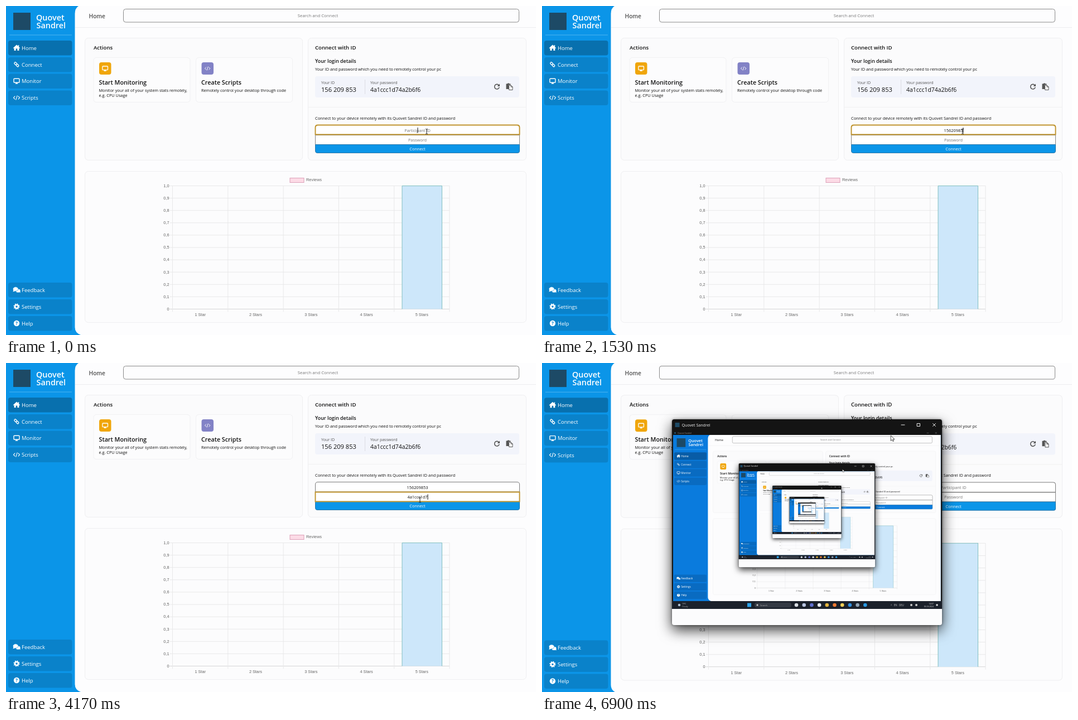
An HTML page that plays this animation: 950 by 590 pixels, repeating every 6.93 s.

```html
<!DOCTYPE html>
<html lang="en">
<head>
<meta charset="utf-8">
<style>
html, body { margin: 0; width: 100%; height: 100%; overflow: hidden; background: #0b95e8; }
svg { display: block; width: 950px; height: 590px; font-family: "Open Sans", "Noto Sans", sans-serif; --blue: #0b95e8; }
text { white-space: pre; }
.chart { font-family: "Liberation Sans", Arial, sans-serif; }
.remote { --blue: #0a7bdd; }
.shadow { filter: drop-shadow(0 0 2px rgba(0,0,0,.5)) drop-shadow(0 9px 12px rgba(0,0,0,.75)); }
</style>
</head>
<body>
<svg id="stage" viewBox="0 0 950 590"></svg>
<script>
const LOOP = 6930;
const ID = "156209853", PASSWORD = "4a1ccc1d74a2b6f6";
const BRAND = ["Quovet", "Sandrel"];
const OPEN = 6200, LAG = 120, LEVELS = 6, FOCUS_SWITCH = 1930;
const BLUE = "var(--blue)";

const rect = (x, y, w, h, fill, r = 0, stroke = "none", width = 1) =>
  `<rect x="${x}" y="${y}" width="${w}" height="${h}" rx="${r}" fill="${fill}" stroke="${stroke}" stroke-width="${width}"/>`;
const line = (x1, y1, x2, y2, color) =>
  `<path d="M${x1} ${y1}L${x2} ${y2}" stroke="${color}"/>`;
const stroke = (d, color, width = 1.2) =>
  `<path d="${d}" fill="none" stroke="${color}" stroke-width="${width}" stroke-linecap="round" stroke-linejoin="round"/>`;
const shape = (d, fill, border = "none") => `<path d="${d}" fill="${fill}" stroke="${border}"/>`;
const circle = (x, y, r, fill) => `<circle cx="${x}" cy="${y}" r="${r}" fill="${fill}"/>`;
const text = (x, y, size, str, fill = "#111", { weight = 400, anchor = "start", cls = "", id = "" } = {}) =>
  `<text x="${x}" y="${y}" font-size="${size}" fill="${fill}" font-weight="${weight}" text-anchor="${anchor}" class="${cls}" id="${id}">${str}</text>`;
const move = (x, y, body) => `<g transform="translate(${x} ${y})">${body}</g>`;
const bold = { weight: 600 }, middle = { anchor: "middle" };

// Icons are drawn around their own centre.
const code = stroke("M-3-2.6L-5.5 0L-3 2.6M3-2.6L5.5 0L3 2.6M1.1-3.6L-1.1 3.6", "#fff", 1.1);
const screen = rect(-5, -4.2, 10, 7, "none", 1, "#fff", 1.4) + shape("M-1.2 3H1.2L2.5 5.2H-2.5Z", "#fff");
const icons = {
  Home: shape("M-6.2 .3L0-5.5L2.8-2.9V-5H4.2V-1.6L6.2 .3L5.3 1.2L4.4 .5V5H1.4V1.6H-1.4V5H-4.4V.5L-5.3 1.2Z", "#fff"),
  Connect: `<g transform="rotate(45) scale(.85)">${rect(-6, -2, 6, 4, "none", 2, "#fff", 1.6)}${rect(-.5, -2, 6, 4, "none", 2, "#fff", 1.6)}</g>`,
  Monitor: screen,
  Scripts: code,
  Feedback: `<ellipse cx="2.6" cy="1.6" rx="4" ry="3.2" fill="#fff"/><ellipse cx="-1.8" cy="-1.4" rx="4.8" ry="3.8" fill="#fff" stroke="#0a8cda" stroke-width=".6"/>`
    + shape("M-5.5 0L-6.5 3.6L-2 2ZM4 3L6.8 5.4L6.2 2Z", "#fff"),
  Settings: `<circle r="3" fill="none" stroke="#fff" stroke-width="2.6"/><circle r="4.7" fill="none" stroke="#fff" stroke-width="1.8" stroke-dasharray="1.85 1.84"/>`,
  Help: circle(0, 0, 5.2, "#fff") + text(0, 3, 8.5, "?", "#0a85d0", { weight: 700, anchor: "middle" })
};

function sidebar() {
  const items = [["Home", 75], ["Connect", 105], ["Monitor", 134.5], ["Scripts", 164.5],
    ["Feedback", 509], ["Settings", 539], ["Help", 569]];
  return rect(0, 0, 950, 590, BLUE)
    + rect(13, 12, 31, 31, "#1d4a66")
    + text(54, 25.5, 14.4, BRAND[0], "#fff", bold) + text(54.5, 40, 14.4, BRAND[1], "#fff", bold)
    + line(6, 52, 118, 52, "#4db3f1")
    + items.map(([name, y], i) =>
        rect(4, y - 13, 114.5, 26.5, `rgba(0,0,0,${i ? .13 : .25})`, 4)
        + move(19, y, icons[name]) + text(28, y + 3.6, 9.5, name, "#fff")).join("");
}

function actions() {
  const card = (x, color, icon, title, lines) =>
    rect(x, 92.5, 173, 80, "#fcfcfd", 5, "#f1f1f3")
    + rect(x + 10, 101, 21.5, 22, color, 4) + move(x + 20.7, 112, icon)
    + text(x + 9.5, 141, 10.75, title, "#111", bold)
    + lines.map((s, i) => text(x + 9.5, 153.5 + 9.3 * i, 7.3, s)).join("");
  return rect(141.5, 57.5, 390, 219, "#fbfbfc", 6, "#efeff1")
    + text(157, 78.3, 9.6, "Actions", "#111", bold)
    + card(157, "#f0a60c", `<g transform="scale(.95)">${screen}</g>`, "Start Monitoring",
        ["Monitor your all of your system stats remotely,", "e.g. CPU Usage"])
    + card(340.5, "#8282c6", `<g transform="scale(.85)">${code}</g>`, "Create Scripts",
        ["Remotely control your desktop through code"]);
}

function connectPanel() {
  const refresh = stroke("M3.3-2.6A4.3 4.3 0 1 0 4 1.7", "#555", 1.6) + shape("M5-5V-.6H.6Z", "#555");
  const paste = shape("M-5.5-5H-3.5L-2.5-6H-.5L.5-5H2.5V-3H-1V4.5H-5.5Z", "#555")
    + shape("M0-2.2H3.2L6-.2V6H0Z", "#fff") + stroke("M0-2.2H3.2L6 .4V6H0ZM3-2V.6H6", "#555", 1);
  return rect(541.5, 57.5, 391, 219, "#fbfbfc", 6, "#efeff1")
    + text(554, 78.3, 9.6, "Connect with ID", "#111", bold)
    + text(554, 102, 8.85, "Your login details", "#111", bold)
    + text(554, 115.6, 7.37, "Your ID and password which you need to remotely control your pc")
    + rect(554, 126, 366, 38, "#f2f4fb", 4)
    + text(565, 140, 7.15, "Your ID", "#555") + text(565, 154.3, 11.1, "156 209 853")
    + line(643.5, 132, 643.5, 158, "#dcdde3")
    + text(653, 140, 7.05, "Your password", "#555") + text(653, 154.3, 10.4, PASSWORD)
    + move(880, 144.5, refresh) + move(902, 144.5, paste)
    + line(542, 181.5, 932, 181.5, "#f1f1f2")
    + text(554, 203.8, 7.35, `Connect to your device remotely with its ${BRAND.join(" ")} ID and password`)
    + shape("M554.5 231V218Q554.5 213.5 559 213.5H916Q920.5 213.5 920.5 218V231Z", "#fff", "#7c7c7c")
    + shape("M554.5 231.5H920.5V248.5H554.5Z", "#fff", "#858585")
    + shape("M554.5 248.5H920.5V260Q920.5 263.5 917 263.5H558Q554.5 263.5 554.5 260Z", BLUE, "#2b77a8")
    + text(737.5, 259, 7.4, "Connect", "#fff", middle)
    + `<path id="focusRing" fill="none" stroke="#c0942e" stroke-width="1.9"/>`
    + text(737.5, 225.6, 7.4, "", "#111", { anchor: "middle", id: "idText" })
    + text(737.5, 242.8, 7.4, "", "#111", { anchor: "middle", id: "passwordText" })
    + `<rect id="caret" width="1" height="9.5" fill="#111"/>`;
}

function chart() {
  const left = 298.5, top = 322.5, bottom = 543.5, columnW = 99.3, rowH = 22.1, grid = "#e8e8e9";
  let out = rect(141.5, 296.5, 791, 271, "#fcfcfd", 6, "#efeff1")
    + rect(509, 308.5, 25, 8, "#fcdbe6", 0, "#dda0b8")
    + text(538, 314.3, 7.4, "Reviews", "#666", { cls: "chart" });
  for (let i = 0; i <= 10; i++) {
    const y = top + rowH * i;
    const label = i === 10 ? "0" : ((10 - i) / 10).toFixed(1).replace(".", ",");
    out += line(left - 5, y, 795, y, i === 10 ? "#d5d5d6" : grid)
      + text(292.5, y + 2.3, 7.3, label, "#666", { anchor: "end", cls: "chart" });
  }
  for (let i = 0; i <= 5; i++) {
    const x = left + columnW * i;
    out += line(x, top, x, bottom + 5, grid);
    if (i < 5) out += text(x + columnW / 2, 556.3, 7.3, `${i + 1} Star${i ? "s" : ""}`, "#666", { anchor: "middle", cls: "chart" });
  }
  return out + rect(710, top, 71.5, bottom - top, "#cde7fa")
    + `<path d="M710 ${bottom}V${top}H781.5V${bottom}" fill="none" stroke="#82c0c0"/>`;
}

const page = () => sidebar()
  + shape("M950 0H130Q123.5 4 123.5 14V576Q123.5 586 134 590H950Z", "#fdfdfe")
  + text(148.5, 21.7, 10.2, "Home", "#505050", bold)
  + rect(210.5, 5.5, 709, 23.5, "#fdfdfe", 4, "#8a8a8a")
  + text(559, 20.3, 7.8, "Search and Connect", "#777", middle)
  + line(124, 38.5, 950, 38.5, "#ececf0")
  + actions() + connectPanel() + chart();

const arrow = "M0 0V9.5L2.3 7.4L3.8 10.6L5.3 9.9L3.9 6.8H6.9Z";

function taskbar() {
  const colors = ["#d8dce2", "#b8c4e0", "#5f6fd0", "#e8edf3", "#e2b33c", "#ef7a32", "#f3cf55", "#2f8fe0", "#8fa3b5", "#2a9ae4"];
  return rect(233, 427, 484, 14, "#1b212b")
    + circle(246, 434, 2.3, "#aebdcc") + text(251, 433, 3.3, "19°C", "#ddd") + text(251, 437.8, 3.3, "Cloudy", "#aaa")
    + rect(368, 430.5, 7, 7, "#2da4ec") + rect(381, 429.5, 66, 9, "#343a44", 4)
    + circle(386, 434, 1.6, "#ccc") + text(391, 435.8, 4.2, "Search", "#aaa")
    + colors.map((c, i) => circle(456 + 13.7 * i, 434, 3.3, c)).join("")
    + text(625, 436, 4.4, "^   EN   DEU", "#ccc") + circle(662, 434, 2, "#ccc") + circle(671, 434, 2, "#ccc")
    + text(702, 433.2, 3.4, "14:07", "#ddd", { anchor: "end" }) + text(702, 438.2, 3.4, "05.03.2024", "#ddd", { anchor: "end" })
    + circle(708, 434, 1.8, "#ddd");
}

// Each remote window shows the whole desktop again, one level deeper.
function remoteWindow(level) {
  const inner = level < LEVELS ? remoteWindow(level + 1) : "";
  return `<g class="window">`
    + `<rect class="shadow" x="233" y="101.5" width="484" height="368.5" rx="4" fill="#fcfcfd"/>`
    + shape("M233 441V105Q233 101 237 101H713Q717 101 717 105V441Z", "#141414")
    + rect(238.5, 107, 8, 8, "#1d4a66") + text(250.5, 113.8, 7.1, BRAND.join(" "), "#f2f2f2")
    + stroke("M644 111H650M672.5 108.5H677.5V113.5H672.5ZM700.5 108.5L705.5 113.5M705.5 108.5L700.5 113.5", "#eee", 1)
    + rect(237, 124, 3, 3, "#1d4a66") + text(243, 127, 3.5, BRAND.join(" "), "#999")
    + stroke("M690 125.5H693M705 124.2L707.5 126.7M707.5 124.2L705 126.7", "#888", .5)
    + `<g class="remote" transform="translate(235 129) scale(.505)"><use href="#page"/>${inner}</g>`
    + taskbar()
    + `</g><path class="pointer" d="${arrow}" fill="#fff" stroke="#222" stroke-width=".8"/>`;
}

const stage = document.getElementById("stage");
stage.innerHTML = `<g id="desktop"><g id="page">${page()}</g></g>${remoteWindow(1)}`
  + `<path id="beam" d="M-2-4.5Q0-4.5 0-3.5Q0-4.5 2-4.5M0-3.5V3.5M-2 4.5Q0 4.5 0 3.5Q0 4.5 2 4.5" fill="none" stroke="#222"/>`;

const el = Object.fromEntries(["desktop", "idText", "passwordText", "focusRing", "caret", "beam"]
  .map(id => [id, document.getElementById(id)]));
const windows = [...stage.querySelectorAll(".window")];
// The deepest pointer comes first in the markup.
const pointers = [...stage.querySelectorAll(".pointer")].reverse();
const show = (node, on) => node.setAttribute("visibility", on ? "visible" : "hidden");
const display = (node, on) => node.setAttribute("display", on ? "inline" : "none");

const track = [[0, 754, 225], [1680, 754, 225], [1880, 742, 245.5], [6150, 742, 245.5], [6600, 565, 110], [6930, 631, 132]];
function mouse(t) {
  const i = Math.max(1, track.findIndex(k => k[0] >= t));
  const [t0, x0, y0] = track[i - 1], [t1, x1, y1] = track[i];
  const p = (t - t0) / (t1 - t0), ease = i === 5 ? p : p * p * (3 - 2 * p);
  return [x0 + (x1 - x0) * ease, y0 + (y1 - y0) * ease];
}

const idKeys = { start: 220, step: 158, value: ID };
const passwordKeys = { start: 2560, step: 172, value: PASSWORD };
function typed({ start, step, value }, t) {
  const n = Math.max(0, Math.min(value.length, Math.floor((t - start) / step)));
  return { text: value.slice(0, n), last: n ? start + n * step : 0 };
}
function setField(node, value, placeholder) {
  node.textContent = value || placeholder;
  node.setAttribute("fill", value ? "#111" : "#777");
}

function render(t) {
  const open = t >= OPEN;
  const id = typed(idKeys, t), password = typed(passwordKeys, t);
  setField(el.idText, open ? "" : id.text, "Participant ID");
  setField(el.passwordText, open ? "" : password.text, "Password");

  const second = t >= FOCUS_SWITCH;
  const field = second ? password : id;
  const node = second ? el.passwordText : el.idText;
  const since = t - Math.max(field.last, second ? FOCUS_SWITCH : 0);
  const half = field.text ? node.getComputedTextLength() / 2 : 0;
  el.caret.setAttribute("x", 737.5 + half);
  el.caret.setAttribute("y", second ? 235.5 : 218);
  show(el.caret, !open && since % 1060 < 530);
  el.focusRing.setAttribute("d", second
    ? "M554.5 231.5H920.5V248.5H554.5Z"
    : "M554.5 230.5V218Q554.5 213.5 559 213.5H916Q920.5 213.5 920.5 218V230.5Z");
  show(el.focusRing, !open);

  el.desktop.setAttribute("transform", open ? "scale(1 1.0025)" : "");
  windows.forEach((w, i) => display(w, t >= OPEN + LAG * i));
  pointers.forEach((p, i) => {
    const at = t - LAG * i;
    display(p, at >= OPEN);
    p.setAttribute("transform", `translate(${mouse(Math.max(0, at)).join(" ")})`);
  });
  display(el.beam, !open);
  el.beam.setAttribute("transform", `translate(${mouse(t).join(" ")})`);
}

const began = performance.now();
function frame() {
  render((performance.now() - began) % LOOP);
  requestAnimationFrame(frame);
}
frame();
</script>
</body>
</html>
```
